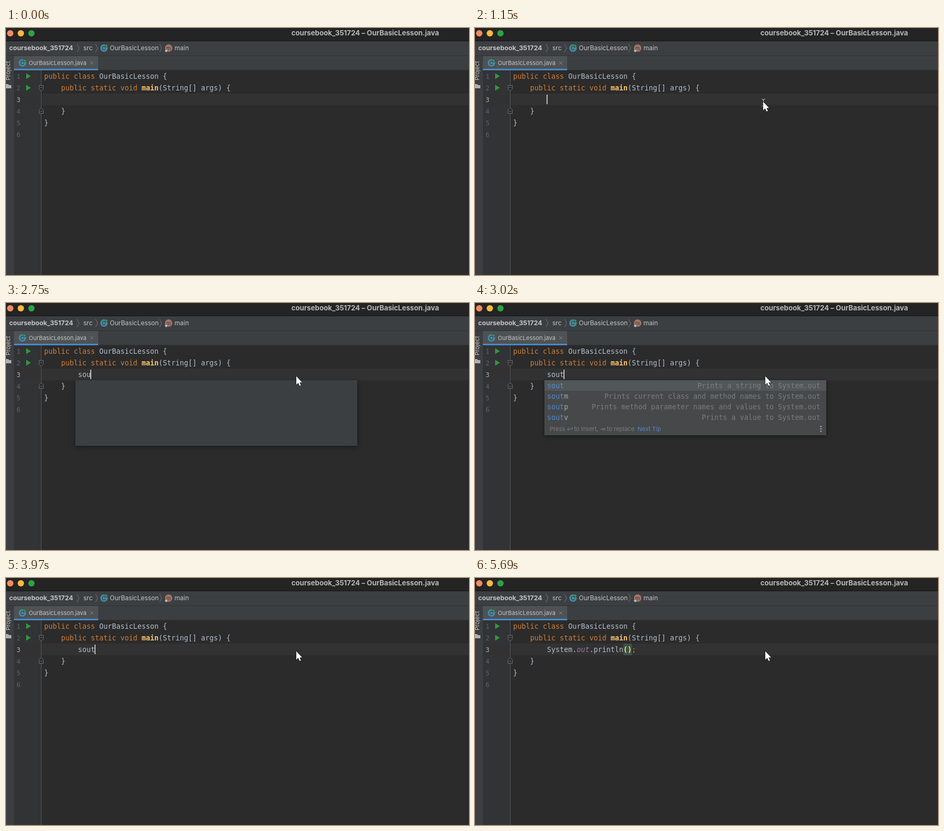
These frames come from a looping animation (874 px wide and 467 px high, 6.24 s). An HTML page with a canvas:

```html
<!DOCTYPE html>
<html lang="en">
<head>
<meta charset="utf-8">
<title>Code editor</title>
<style>
html, body { margin: 0; width: 100%; height: 100%; overflow: hidden; background: #2b2b2b; }
canvas { display: block; }
</style>
</head>
<body>
<canvas id="stage" width="874" height="467"></canvas>
<script>
const ctx = document.getElementById('stage').getContext('2d');
const LOOP = 6240, CHAR = 8, LEFT = 72;
const MONO = '13.29px "DejaVu Sans Mono", monospace';
const ui = (size, weight = 400) => `${weight} ${size}px Inter, sans-serif`;
const PLAIN = '#b1becc', KEYWORD = '#d07c36', BLUE = '#589df6', LABEL = '#c3c3c3', PANEL = '#3c3f41';
const PROJECT = 'coursebook_351724', CLASS = 'OurBasicLesson';

function rect(x, y, w, h, color) {
  ctx.fillStyle = color;
  ctx.fillRect(x, y, w, h);
}

function text(str, x, y, color, font, align = 'left') {
  ctx.font = font;
  ctx.fillStyle = color;
  ctx.textAlign = align;
  ctx.fillText(str, x, y);
}

function disc(x, y, r, color) {
  ctx.fillStyle = color;
  ctx.beginPath();
  ctx.arc(x, y, r, 0, 7);
  ctx.fill();
}

function shape(d, x, y, fill, stroke, width = 1) {
  const path = new Path2D(d);
  ctx.save();
  ctx.translate(x, y);
  ctx.lineWidth = width;
  ctx.lineJoin = 'round';
  if (fill) { ctx.fillStyle = fill; ctx.fill(path); }
  if (stroke) { ctx.strokeStyle = stroke; ctx.stroke(path); }
  ctx.restore();
}

// Fill on top of a wider halo.
function haloShape(d, x, y, fill, halo, width) {
  shape(d, x, y, null, halo, width);
  shape(d, x, y, fill);
}

// Each part is [string, color, style]; columns are fixed width.
function code(row, col, parts) {
  for (const [str, color = PLAIN, style = ''] of parts) {
    text(str, LEFT + col * CHAR, 96 + row * 22, color, `${style} ${MONO}`);
    col += str.length;
  }
}

function classIcon(x, y) {
  disc(x, y, 7, '#4889a3');
  text('C', x - 0.5, y + 4, '#24414e', ui(10.5, 500), 'center');
  haloShape('M0 0 L5 3 L0 6 Z', x + 2.5, y - 7.5, '#35a045', PANEL, 1.5);
}

function drawWindow() {
  rect(0, 0, 874, 467, '#2b2b2b');
  rect(0, 0, 874, 24, '#242424');
  rect(0, 24, 874, 1, '#151515');
  ['#f58a5f', '#fdb93c', '#2ba346'].forEach((color, i) => disc(8 + i * 20, 10, 6, color));
  text(`${PROJECT} – ${CLASS}.java`, 678, 14, '#b8b8b8', ui(13.2, 700), 'center');

  rect(0, 25, 874, 55, PANEL);
  rect(0, 52, 874, 1, '#303233');
  rect(15, 79, 859, 1, '#323232');
  text(PROJECT, 6, 42, LABEL, ui(12.3, 700));
  text('src', 146, 42, LABEL, ui(12));
  text(CLASS, 196, 42, LABEL, ui(12));
  text('main', 318, 42, LABEL, ui(12));
  for (const x of [134, 169, 290]) shape('M0 0 L4 7.5 L0 15', x, 30.5, null, '#747678');
  classIcon(185, 38);
  disc(307, 38, 7, '#a0766a');
  text('m', 307, 41.5, '#4b302a', ui(10), 'center');
  haloShape('M0 -3 L3 0 L0 3 L-3 0 Z', 302.5, 43, '#b7bcc0', PANEL, 1);

  rect(15, 53, 159, 27, '#4e5254');
  rect(15, 77, 159, 3, '#4a88c7');
  classIcon(31, 66);
  text(`${CLASS}.java`, 43, 70, LABEL, ui(11));
  shape('M-3 -3 L3 3 M3 -3 L-3 3', 162, 66, null, '#808284');

  rect(0, 80, 15, 387, PANEL);
  ctx.save();
  ctx.translate(8, 99);
  ctx.rotate(-Math.PI / 2);
  text('Project', 0, 0, LABEL, ui(11));
  ctx.restore();
  shape('M0 0 H4 L6 2 H10 V8 H0 Z', 0, 106, '#afb1b3');
}

function drawCode() {
  rect(15, 80, 51, 387, '#313335');
  rect(15, 124, 859, 22, '#323232');
  rect(66, 80, 1, 387, '#555555');
  for (let i = 0; i < 6; i++)
    text(String(i + 1), 20, 96 + i * 22, i === 2 ? '#b0b0b0' : '#606366', '12px "DejaVu Sans Mono", monospace');
  for (const y of [86, 108]) shape('M0 0 L9 5.5 L0 11 Z', 38, y - 0.5, '#35963f');
  shape('M-4 -5 H4 V2 L0 6 L-4 2 Z M-2 -1 H2', 66.5, 113.5, '#2b2b2b', '#6e7072');
  shape('M-4 5 H4 V-2 L0 -6 L-4 -2 Z M-2 1 H2', 66.5, 156.5, '#2b2b2b', '#6e7072');

  code(0, 0, [['public class ', KEYWORD], [`${CLASS} {`]]);
  code(1, 4, [['public static void ', KEYWORD], ['main', '#ffc66d', 'bold'], ['(String[] args) {']]);
  code(3, 4, [['}']]);
  code(4, 0, [['}']]);
}

function drawTyping(t) {
  let caretCol;
  if (t >= 4170) {
    const matched = t >= 4370;
    if (matched) rect(280, 124, 16, 22, '#3b514d');
    code(2, 8, [
      ['System.'],
      t < 5030 ? ['out'] : ['out', '#9876aa', 'italic'],
      ['.println'],
      matched ? ['()', '#ffef28', 'bold'] : ['()'],
      [';', KEYWORD]
    ]);
    caretCol = 19;
    caretCol += 8;
  } else {
    const count = [2360, 2550, 2750, 2950].filter(key => t >= key).length;
    code(2, 8, [['sout'.slice(0, count)]]);
    caretCol = 8 + count;
  }
  const caretOn = (t >= 130 && t < 650) || (t >= 1150 && t < 1630) || (t >= 2360 && t < 5690);
  if (caretOn) rect(LEFT + caretCol * CHAR - 1, 126, 2, 18, '#bbbbbb');
}

function drawPopup(t) {
  if (t < 2750 || t >= 3970) return;
  const filled = t >= 3020, height = filled ? 104 : 124;
  ctx.save();
  ctx.shadowColor = 'rgba(0,0,0,.45)';
  ctx.shadowBlur = 8;
  ctx.shadowOffsetY = 2;
  rect(131, 146, 532, height, filled ? '#46484a' : PANEL);
  ctx.restore();
  if (!filled) return;

  rect(131, 146, 532, 20, '#515658');
  ctx.globalAlpha = t < 3240 ? 0.75 : 1;
  [
    ['', 'Prints a string to System.out'],
    ['m', 'Prints current class and method names to System.out'],
    ['p', 'Prints method parameter names and values to System.out'],
    ['v', 'Prints a value to System.out']
  ].forEach(([suffix, hint], i) => {
    const y = 161 + i * 20;
    text('sout', 136, y, BLUE, MONO);
    text(suffix, 168, y, LABEL, MONO);
    text(hint, 652, y, '#8c8c8c', MONO, 'right');
  });
  const small = ui(11), gray = '#8c8c8c';
  text('Press', 141, 242, gray, small);
  shape('M9 0 V4 H0 M3 1 L0 4 L3 7', 174.5, 234.5, null, gray);
  text('to insert,', 187, 242, gray, small);
  shape('M0 3 H7 M4 0 L7 3 L4 6 M9 0 V6', 236.5, 235.5, null, gray);
  text('to replace', 249, 242, gray, small);
  text('Next Tip', 307, 242, BLUE, small);
  for (const y of [233.5, 238, 242.5]) disc(653, y, 1.5, '#b5b7b9');
  ctx.globalAlpha = 1;
  if (t >= 3640) {
    disc(633, 236, 5, '#f2a733');
    rect(630.5, 239, 5, 3, '#f2a733');
    rect(631, 243, 4, 2, '#b5b7b9');
  }
}

function drawPointer(t) {
  if (t < 130) return;
  const tick = 130 + Math.floor((t - 130) / 68) * 68;
  const remaining = Math.max(0, 1 - (tick - 130) / 1020) ** 1.63;
  const drift = Math.min(1, Math.max(0, (tick - 1150) / 476));
  const x = 544 + 281 * remaining + 4 * drift;
  const y = 139.5 + 317 * remaining - drift;
  if (t < 2360)
    shape('M-3 -5 Q0 -5 0 -3 Q0 -5 3 -5 M0 -3 V6 M-3 8 Q0 8 0 6 Q0 8 3 8 M-2 3 H2', x + 0.5, y, null, '#e0e0e0');
  haloShape('M0 0 V16 L3.6 12.5 L6.3 18.3 L8.8 17.2 L6.2 11.7 H11 Z', x, y, '#ffffff', '#1c1c1c', 1.6);
}

function frame(now) {
  const t = now % LOOP;
  drawWindow();
  drawCode();
  drawTyping(t);
  drawPopup(t);
  drawPointer(t);
  requestAnimationFrame(frame);
}
requestAnimationFrame(frame);
</script>
</body>
</html>
```
